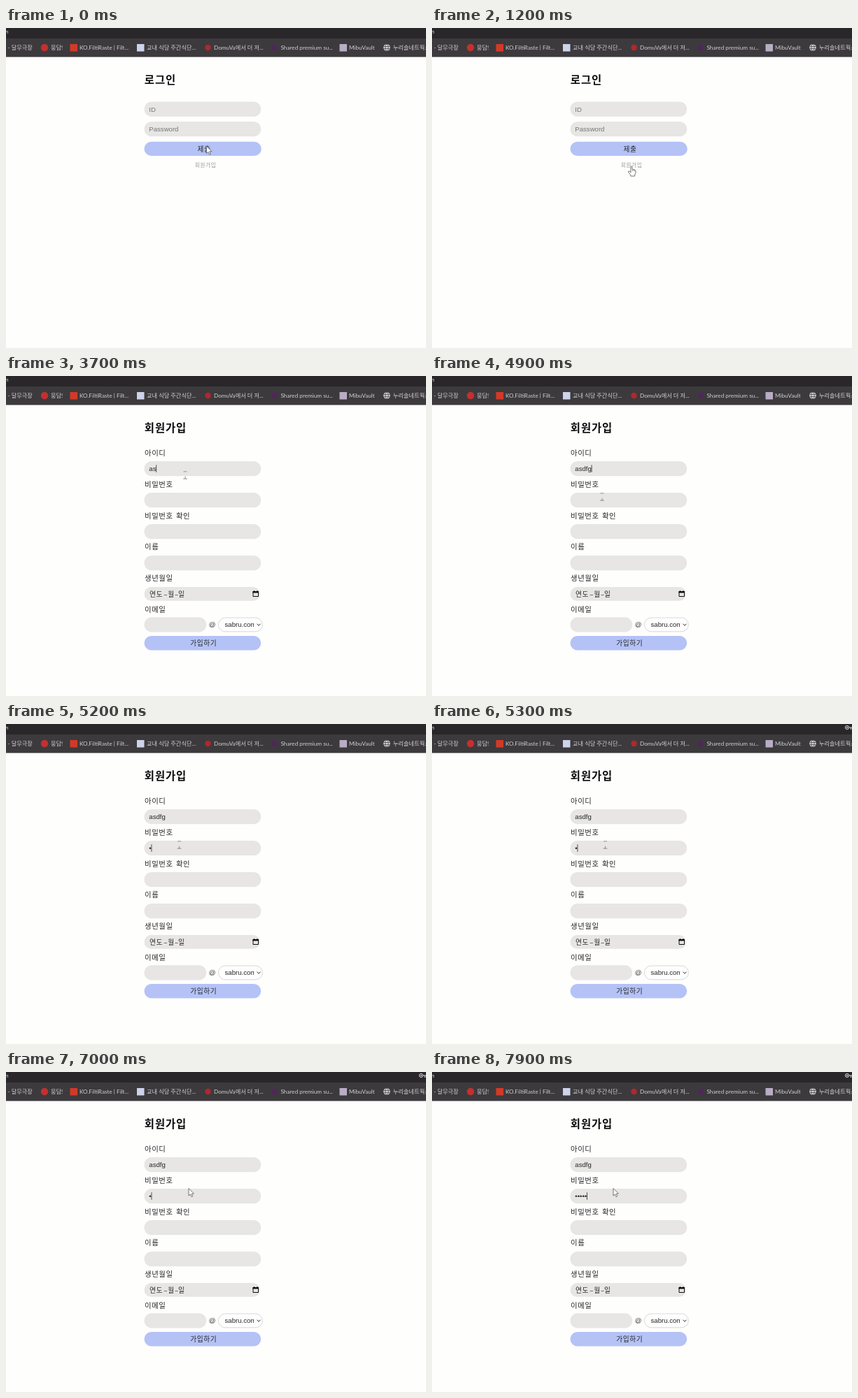
An HTML page with a canvas that plays this animation: 600x458 px, repeating every 8000 ms.

```html
<!DOCTYPE html>
<html lang="ko">
<head>
<meta charset="utf-8">
<style>
  html, body { margin: 0; width: 100%; height: 100%; overflow: hidden; background: #fefefd; }
  canvas { display: block; }
</style>
</head>
<body>
<canvas id="stage" width="600" height="458"></canvas>
<script>
const ctx = document.getElementById('stage').getContext('2d');
const LOOP = 8000, TICK = 100;
const KOREAN = '"Noto Sans CJK KR", "Noto Sans CJK", sans-serif';
const LATIN = '"Liberation Sans", sans-serif';
const BAR = 'Lato, ' + KOREAN;
const FIELD = '#e7e6e4', BUTTON = '#b4c2f6', INK = '#0c0c0e', SOFT_INK = '#262628';

// Each track lists [start time, value]; a value holds until the next entry.
const idLength = [[0, 0], [3500, 1], [3700, 2], [3800, 3], [4200, 4], [4400, 5]];
const dotCount = [[0, 0], [5200, 1], [5500, 2], [6000, 3], [6500, 1], [6600, 0],
                  [6900, 1], [7100, 2], [7300, 3], [7400, 4], [7700, 5]];
const keyShown = [[0, false], [5300, true], [6700, false], [7000, true]];
const focus = [[0, ''], [3000, 'id'], [5000, 'password']];
const pointer = [
  [900, ['hand', 285, 198]],
  [2700, ['arrow', 268, 162]],
  [2800, ['beam', 254, 142]],
  [3000, ['beam', 256, 142]],
  [4000, ['beam', 257, 138]],
  [4700, ['beam', 254, 143]],
  [4800, ['arrow', 246, 156]],
  [4900, ['beam', 243, 173]],
  [5000, ['beam', 246, 173]],
  [5200, ['beam', 247.5, 173]],
  [6000, ['arrow', 261, 166.5]],
  [7900, ['arrow', 259, 166.5]]
];

function valueAt(track, t) {
  let value = track[0][1];
  for (const [start, v] of track) if (t >= start) value = v;
  return value;
}

function text(str, x, y, size, { family = KOREAN, color = SOFT_INK, weight = 400, align = 'left' } = {}) {
  const tracking = family === KOREAN ? 0.06 * size : 0;
  ctx.font = `${weight} ${size}px ${family}`;
  ctx.letterSpacing = `${tracking}px`;
  ctx.wordSpacing = `${tracking * 2}px`;
  ctx.fillStyle = color;
  ctx.textAlign = align;
  ctx.fillText(str, x, y);
  return ctx.measureText(str).width;
}

function pill(x, y, w, h, fill, stroke) {
  ctx.beginPath();
  ctx.roundRect(x, y, w, h, h / 2);
  ctx.fillStyle = fill;
  ctx.fill();
  if (stroke) {
    ctx.strokeStyle = stroke;
    ctx.lineWidth = 0.8;
    ctx.stroke();
  }
}

function disc(x, y, r, color) {
  ctx.beginPath();
  ctx.arc(x, y, r, 0, Math.PI * 2);
  ctx.fillStyle = color;
  ctx.fill();
}

function rect(x, y, w, h, color) {
  ctx.fillStyle = color;
  ctx.fillRect(x, y, w, h);
}

function globe(x, y) {
  disc(x, y, 4.8, '#d4d4d6');
  ctx.strokeStyle = '#4a484c';
  ctx.lineWidth = 0.8;
  ctx.beginPath();
  ctx.ellipse(x, y, 2.1, 4.6, 0, 0, Math.PI * 2);
  ctx.moveTo(x - 4.5, y - 1.5);
  ctx.lineTo(x + 4.5, y - 1.5);
  ctx.moveTo(x - 4.5, y + 1.6);
  ctx.lineTo(x + 4.5, y + 1.6);
  ctx.stroke();
}

function keyIcon() {
  ctx.strokeStyle = '#d6d6d8';
  ctx.lineWidth = 1;
  ctx.beginPath();
  ctx.arc(593, 5, 2.6, 0, Math.PI * 2);
  ctx.moveTo(596, 5);
  ctx.lineTo(600, 5);
  ctx.moveTo(598.5, 5);
  ctx.lineTo(598.5, 8);
  ctx.stroke();
  disc(593, 5, 1.1, '#d6d6d8');
}

function drawBrowser(t) {
  rect(0, 0, 600, 15, '#29272a');
  rect(0, 15, 600, 26.5, '#3d3a3e');
  const label = (str, x, y = 31) => text(str, x, y, 8.2, { family: BAR, color: '#d0cfd1' });
  label('n', -1, 8);
  label('- 달무극장', 2.5);
  disc(55, 28, 5.2, '#c62f2d');
  label('뭉담!', 64);
  rect(91.5, 23, 10.5, 10.5, '#d23a28');
  label('KO.FiltiRaste | Filt...', 105);
  rect(187, 23, 10.5, 10.5, '#ccd3ea');
  label('교내 식당 주간식단...', 201);
  disc(288.5, 28, 4.2, '#b3272c');
  label('DomuVa에서 더 저...', 297);
  disc(383.5, 28, 4, '#512659');
  label('Shared premium su...', 392.5);
  rect(476.5, 23, 10.5, 10.5, '#b8adc5');
  label('MibuVault', 490);
  globe(544, 28);
  label('누리솔네트웍스', 553);
  if (valueAt(keyShown, t)) keyIcon();
}

function heading(str) {
  text(str, 197.8, 80.3, 15.4, { weight: 700, color: INK });
}

function drawLogin() {
  const hint = { family: LATIN, color: '#767676' };
  heading('로그인');
  pill(197.5, 105.5, 166.7, 21.3, FIELD);
  pill(197.5, 134, 166.7, 21.3, FIELD);
  text('ID', 204.3, 119.5, 9.6, hint);
  text('Password', 204.3, 148, 9.6, hint);
  pill(197.5, 162.7, 167.3, 20.4, BUTTON);
  text('제출', 282.9, 176.6, 9.7, { align: 'center' });
  text('회원가입', 285, 199, 7.8, { color: '#999', align: 'center' });
}

function calendarIcon() {
  ctx.strokeStyle = INK;
  ctx.lineWidth = 1;
  ctx.strokeRect(353, 308.5, 7.5, 7);
  rect(352.5, 308, 8.5, 2.4, INK);
  rect(354, 307, 1, 1.5, INK);
  rect(358.5, 307, 1, 1.5, INK);
}

function emailRow() {
  pill(197.5, 345.3, 88.7, 21.3, FIELD);
  text('@', 289.8, 359, 9.6, { family: LATIN, color: '#3a3a3c' });
  pill(303.4, 346, 63, 19.8, '#fefefe', '#cfcfcf');
  ctx.save();
  ctx.beginPath();
  ctx.rect(305, 346, 49.5, 20);
  ctx.clip();
  text('sabru.com', 312.5, 359.2, 9.6, { family: LATIN });
  ctx.restore();
  ctx.strokeStyle = SOFT_INK;
  ctx.lineWidth = 1;
  ctx.beginPath();
  ctx.moveTo(358.5, 354.7);
  ctx.lineTo(361, 357.2);
  ctx.lineTo(363.5, 354.7);
  ctx.stroke();
}

function typed(str, top, focused) {
  const width = text(str, 204.3, top + 14, 9.6, { family: LATIN });
  if (focused) rect(204.2 + width, top + 5.3, 0.8, 10.5, SOFT_INK);
}

function drawSignup(t) {
  heading('회원가입');
  ['아이디', '비밀번호', '비밀번호 확인', '이름', '생년월일', '이메일'].forEach((str, i) => {
    text(str, 198, 114 + i * 44.8, 10.4);
  });
  for (let i = 0; i < 4; i++) pill(197.5, 122 + i * 45, 166.7, 21.3, FIELD);

  const active = valueAt(focus, t);
  typed('asdfg'.slice(0, valueAt(idLength, t)), 122, active === 'id');
  typed('•'.repeat(valueAt(dotCount, t)), 167, active === 'password');

  pill(197.5, 302, 165.5, 19.8, FIELD);
  [['연도', 205], ['–', 225.2], ['월', 231.3], ['–', 240.9], ['일', 246]]
    .forEach(([str, x]) => text(str, x, 315.5, 9.7));
  calendarIcon();
  emailRow();
  pill(197.5, 372, 166.7, 20.4, BUTTON);
  text('가입하기', 282.3, 385.8, 9.7, { align: 'center' });
}

function outline(points, x, y) {
  ctx.beginPath();
  points.forEach(([px, py]) => ctx.lineTo(x + px, y + py));
  ctx.closePath();
  ctx.fillStyle = '#fff';
  ctx.strokeStyle = '#66666a';
  ctx.lineWidth = 0.9;
  ctx.lineJoin = 'round';
  ctx.fill();
  ctx.stroke();
}

const cursors = {
  arrow(x, y) {
    outline([[0, 0], [0, 10.6], [2.4, 8.4], [4.1, 12.2], [5.8, 11.4], [4.2, 7.8], [7.4, 7.6]], x, y);
  },
  hand(x, y) {
    outline([[-1, 0.5], [0, -0.2], [1, 0.5], [1, 4.3], [3, 4.5], [5, 5.2], [6, 6.2], [6, 9.5],
             [4.7, 12], [4.7, 14], [-1.2, 14], [-1.2, 12.4], [-4.4, 8.4], [-4.2, 7], [-3, 7], [-1, 8.8]], x, y);
    for (const dx of [1, 2.8, 4.5]) rect(x + dx, y + 4.6, 0.6, 2.6, '#77777b');
  },
  beam(x, y) {
    rect(x - 2.5, y - 5.6, 5, 0.9, '#8b8a89');
    rect(x - 0.4, y + 1.6, 0.9, 3.2, '#8b8a89');
    rect(x - 2.8, y + 4.6, 5.6, 0.9, '#777675');
  }
};

function drawPointer(t) {
  if (t >= 900) {
    const [shape, x, y] = valueAt(pointer, t);
    cursors[shape](x, y);
    return;
  }
  const p = t / 900;
  const eased = p * p * (3 - 2 * p);
  const x = 286.5 - 1.5 * eased, y = 169 + 29 * eased;
  cursors[y > 191 ? 'hand' : 'arrow'](x, y);
}

function render(now) {
  const t = Math.floor((now % LOOP) / TICK) * TICK;
  rect(0, 0, 600, 458, '#fefefd');
  drawBrowser(t);
  if (t < 2300) drawLogin();
  else drawSignup(t);
  drawPointer(t);
}

const start = performance.now();
function frame() {
  render(performance.now() - start);
  requestAnimationFrame(frame);
}
frame();
</script>
</body>
</html>
```
